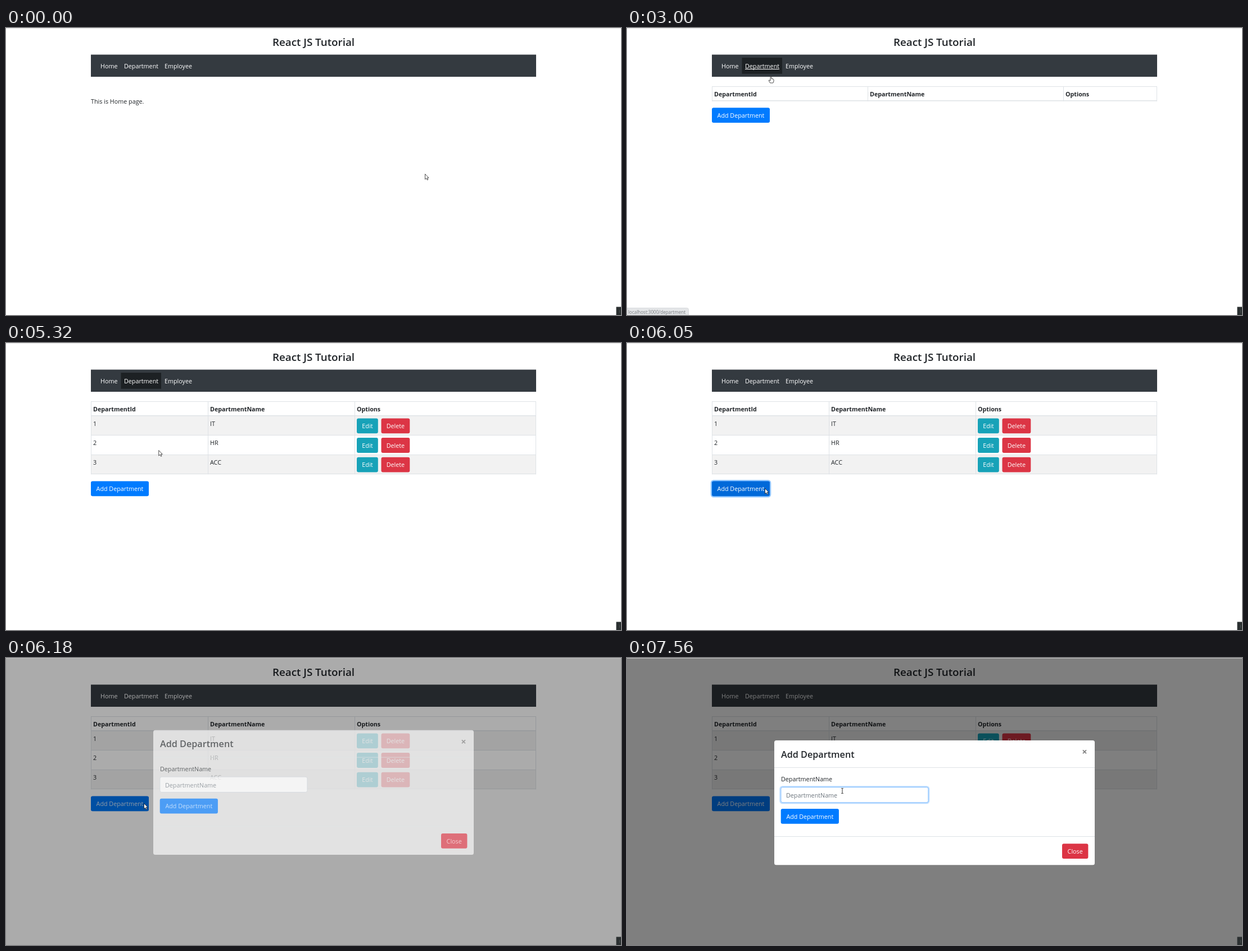
Animation of 1094x512 px, one loop 8000 ms. Source, as an HTML page with a canvas:

```html
<!DOCTYPE html>
<html lang="en">
<head>
<meta charset="utf-8">
<title>React JS Tutorial</title>
<style>
  html, body { margin: 0; width: 100%; height: 100%; overflow: hidden; background: #fff; }
  canvas { display: block; }
</style>
</head>
<body>
<canvas id="stage" width="1094" height="512"></canvas>
<script>
const ctx = document.getElementById('stage').getContext('2d');
const LOOP = 8000;
const FONT = '"Open Sans", "Noto Sans", sans-serif';
const INK = '#212529', LINE = '#dee2e6', BLUE = '#007bff', TEAL = '#17a2b8', RED = '#dc3545';

// Moments in ms
const HOVER = 1800, STATUS = 1970, OPEN_PAGE = 2240, LEAVE_LINK = 3080;
const ROWS_LOADED = 4190, PRESS = 5860, MODAL = 6087, FOCUS_INPUT = 7030, BLINK = 530;

// Pointer moves: start, end, number of steps, points
const MOVES = [
  [510, 1310, 12, [[745, 260], [747, 264], [660, 256], [520, 234], [431, 218]]],
  [1370, 1840, 8, [[431, 218], [395, 190], [300, 108], [250, 70]]],
  [2860, 3610, 12, [[250, 70], [256, 86], [268, 120], [272, 138], [267, 145]]],
  [3740, 4130, 6, [[267, 145], [275, 154]]],
  [5120, 5920, 13, [[275, 154], [274, 180], [262, 228], [250, 254], [245, 259]]],
  [6310, 6710, 7, [[245, 259], [290, 252], [360, 242], [386, 239]]],
  [6910, 7360, 8, [[386, 239], [383, 237]]]
];

const clamp = v => Math.max(0, Math.min(1, v));
const ramp = (t, start, length) => clamp((t - start) / length);

function pointerAt(t) {
  const [t0, t1, n, pts] = MOVES.filter(m => m[0] <= t + 4).pop() || MOVES[0];
  const step = Math.floor((t - t0 + 8) / ((t1 - t0) / (n - 1))) + 1;
  const u = clamp(step / n) * (pts.length - 1);
  const i = Math.min(Math.floor(u), pts.length - 2);
  const [a, b] = [pts[i], pts[i + 1]];
  return [a[0] + (b[0] - a[0]) * (u - i), a[1] + (b[1] - a[1]) * (u - i)];
}

// cubic-bezier(0, 0, .58, 1)
function easeOut(x) {
  let lo = 0, hi = 1;
  for (let i = 0; i < 20; i++) {
    const s = (lo + hi) / 2;
    if (1.74 * s * s - 0.74 * s ** 3 < x) lo = s; else hi = s;
  }
  return 3 * lo * lo - 2 * lo ** 3;
}

function rect(x, y, w, h, color) {
  ctx.fillStyle = color;
  ctx.fillRect(x, y, w, h);
}

function box(x, y, w, h, r, fill, stroke) {
  ctx.beginPath();
  ctx.roundRect(x, y, w, h, r);
  if (fill) { ctx.fillStyle = fill; ctx.fill(); }
  if (stroke) { ctx.strokeStyle = stroke; ctx.lineWidth = 1; ctx.stroke(); }
}

// y is the middle of the capitals
function text(str, x, y, { size = 10.75, weight = 400, color = INK, align = 'left' } = {}) {
  ctx.font = `${weight} ${size}px ${FONT}`;
  ctx.textAlign = align;
  ctx.fillStyle = color;
  ctx.fillText(str, x, y + size * 0.36);
}

function button(label, x, y, w, color) {
  box(x, y, w, 26.8, 3, color);
  text(label, x + w / 2, y + 13.8, { color: '#fff', align: 'center' });
}

function ring(x, y, w, h, color, alpha) {
  if (alpha <= 0) return;
  ctx.save();
  ctx.globalAlpha *= alpha;
  ctx.strokeStyle = color;
  ctx.lineWidth = 2.3;
  ctx.beginPath();
  ctx.roundRect(x - 1.1, y - 1.1, w + 2.2, h + 2.2, 4);
  ctx.stroke();
  ctx.restore();
}

function navbar(t) {
  text('React JS Tutorial', 547, 25, { size: 18.8, weight: 600, align: 'center' });
  rect(151, 47.5, 792, 39.5, '#343a40');
  if (t >= HOVER && t < PRESS) rect(204.5, 53, 71.5, 28.7, '#1d2124');
  if (t >= HOVER && t < LEAVE_LINK) rect(210, 73, 61, 1, '#fff');
  [['Home', 168], ['Department', 210], ['Employee', 282]]
    .forEach(([label, x]) => text(label, x, 68, { color: '#fff' }));
}

function table(loaded) {
  const cols = loaded ? [151, 359, 620, 943] : [151, 428, 776, 943];
  const names = loaded ? ['IT', 'HR', 'ACC'] : [];
  const rowTop = i => 130.5 + i * 34.6;
  const bottom = rowTop(names.length);

  names.forEach((name, i) => {
    if (i % 2 === 0) rect(151, rowTop(i), 792, 34.6, '#f2f2f2');
  });
  cols.forEach(x => rect(Math.min(x, 942), 104.5, 1, bottom - 104.5, LINE));
  rect(151, 104, 792, 1, LINE);
  rect(151, 129, 792, 1.5, LINE);
  ['DepartmentId', 'DepartmentName', 'Options']
    .forEach((label, i) => text(label, cols[i] + 4, 118, { weight: 700, size: 10.7 }));
  names.forEach((name, i) => {
    const y = rowTop(i);
    rect(151, Math.round(y + 33.6), 792, 1, LINE);
    text(String(i + 1), cols[0] + 4, y + 13.2);
    text(name, cols[1] + 4, y + 13.2);
    button('Edit', 624, y + 4, 37.8, TEAL);
    button('Delete', 667.5, y + 4, 50.8, RED);
  });
}

function addButton(t, loaded, [px, py]) {
  const y = loaded ? 246.4 : 142.2;
  const inside = px < 254 && py > y && py < y + 27;
  button('Add Department', 151, y, 103, BLUE);
  const hover = loaded && inside ? 1 - ramp(t, MODAL, 150) : 0;
  if (hover) {
    ctx.globalAlpha = hover;
    button('Add Department', 151, y, 103, '#0069d9');
    ctx.globalAlpha = 1;
  }
  if (t < MODAL) ring(151, y, 103, 26.8, 'rgba(38,143,255,.5)', ramp(t, 5905, 130));
}

function status(t) {
  const alpha = ramp(t, STATUS, 70) * (1 - ramp(t, LEAVE_LINK, 130));
  if (!alpha) return;
  ctx.globalAlpha = alpha;
  box(-4, 499.5, 113.5, 18, 3, '#e4e6e8', '#d8dadd');
  text('localhost:3000/department', 2, 507, { size: 8.05, color: '#777a7e' });
  ctx.globalAlpha = 1;
}

function modal(t) {
  const fade = ramp(t, MODAL, 150);
  if (!fade) return;
  rect(0, 0, 1094, 512, `rgba(0,0,0,${fade / 2})`);
  ctx.save();
  ctx.globalAlpha = fade;
  ctx.translate(0, -35.7 * (1 - easeOut(ramp(t, MODAL, 300))));
  box(262, 147, 570, 222.3, 3.5, '#fff');
  rect(262, 195, 570, 1, LINE);
  rect(262, 318, 570, 1, LINE);
  text('Add Department', 274, 172, { size: 16.2, weight: 600 });
  text('×', 814, 167.5, { size: 16.5, weight: 700, color: '#7f7f7f', align: 'center' });
  text('DepartmentName', 274, 216.5);

  const focus = ramp(t, FOCUS_INPUT, 150);
  ring(273.5, 230.5, 262.5, 27.5, 'rgba(0,123,255,.25)', focus);
  box(273.9, 230.5, 262, 27.3, 3, '#fff', focus ? '#80bdff' : '#ced4da');
  text('DepartmentName', 283, 245, { color: '#6c757d' });
  if (t >= FOCUS_INPUT && t < FOCUS_INPUT + BLINK) rect(283, 236, 1, 16, '#495057');

  button('Add Department', 273.7, 269, 103.2, BLUE);
  button('Close', 774, 331.3, 46.4, RED);
  ctx.restore();
}

const SHAPES = {
  arrow: new Path2D('M.5 .5V10L2.7 8L4.3 11.2L5.8 10.5L4.3 7.3H7Z'),
  hand: new Path2D('M-1 1Q0-.6 1 1V4.4Q5 4.4 5 6.6V9L3.8 12H-1.4L-4 7.6Q-3.6 6-1 8Z')
};

function pointer(t, [x, y]) {
  ctx.save();
  ctx.translate(x, y);
  if (t > 6300 && x > 280) {
    rect(-0.5, -4.5, 1, 9, '#333');
    rect(-2, -5, 4, 1, '#555');
    rect(-2, 4, 4, 1, '#555');
  } else {
    const shape = t >= HOVER && t < LEAVE_LINK ? SHAPES.hand : SHAPES.arrow;
    ctx.fillStyle = '#fff';
    ctx.strokeStyle = '#222';
    ctx.lineWidth = 0.8;
    ctx.fill(shape);
    ctx.stroke(shape);
  }
  ctx.restore();
}

function draw(t) {
  const tip = pointerAt(t);
  const loaded = t >= ROWS_LOADED;
  // The dialog advances in the same coarse steps as the pointer
  const stepped = t < 5990 ? t : 5990 + Math.floor((t - 5982) / 65.45) * 65.45;

  rect(0, 0, 1094, 512, '#fff');
  navbar(t);
  if (t < OPEN_PAGE) {
    text('This is Home page.', 151, 131);
  } else {
    table(loaded);
    addButton(stepped, loaded, tip);
  }
  status(t);
  modal(stepped);
  rect(0, 0, 1094, 1, t < MODAL ? '#e4e4e4' : '#bdbdbd');
  rect(1085.5, 497.5, 8.5, 14.5, '#2b3031');
  rect(1091, 503, 1, 5, '#454b4c');
  pointer(t, tip);
}

function tick() {
  draw(performance.now() % LOOP);
  requestAnimationFrame(tick);
}
tick();
</script>
</body>
</html>
```
